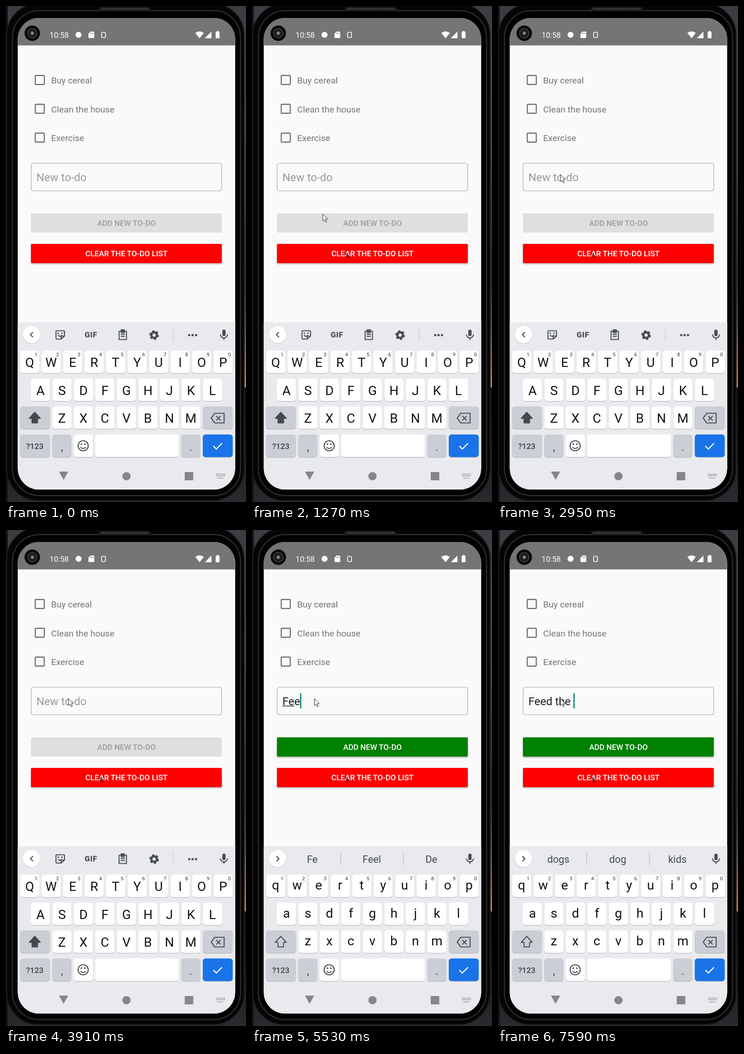
An HTML page that plays this animation: 521 by 1076 pixels, repeating every 8000 ms.

```html
<!DOCTYPE html>
<html lang="en">
<head>
<meta charset="utf-8">
<title>To-do list</title>
<style>
  html, body { margin: 0; width: 100%; height: 100%; overflow: hidden; background: #0b0b0c; }
  svg { display: block; width: 100%; height: 100%; font-family: Roboto, Arial, sans-serif; }
  text { white-space: pre; }
  .mid { text-anchor: middle; }
  .line { fill: none; stroke: #4a4d51; stroke-width: 2.2; }
</style>
</head>
<body>
<svg id="stage" viewBox="0 0 521 1076">
  <defs>
    <linearGradient id="wall" x2="0" y2="1">
      <stop offset="0" stop-color="#3c3d42"/><stop offset=".25" stop-color="#44454b"/>
      <stop offset=".55" stop-color="#2d2a32"/><stop offset=".63" stop-color="#53404a"/>
      <stop offset=".72" stop-color="#a9613a"/><stop offset=".768" stop-color="#d77a31"/>
      <stop offset=".77" stop-color="#0d0d10"/><stop offset="1" stop-color="#2a2b2f"/>
    </linearGradient>
    <filter id="lift" x="-5%" y="-20%" width="110%" height="160%">
      <feDropShadow dx="0" dy="2" stdDeviation="1.7" flood-opacity=".32"/>
    </filter>
    <clipPath id="screen"><rect x="25.5" y="26" width="472" height="1023" rx="46"/></clipPath>
  </defs>

  <rect width="521" height="1076" fill="url(#wall)"/>
  <rect width="4" height="1076" fill="#151517"/>
  <rect x="1.5" y="-5" width="515.5" height="1078" rx="68" fill="#050505" stroke="#1d1e20" stroke-width="2"/>
  <rect x="14" y="10" width="495" height="1052" rx="58" fill="#000" stroke="#2b2d2f" stroke-width="2.5"/>
  <rect x="202" y="2" width="111" height="9" rx="4" fill="#1c1c1c"/>
  <path d="M207 6.5H309" stroke="#4b4b4b" stroke-width="4" stroke-dasharray="2 2"/>

  <g clip-path="url(#screen)">
    <rect x="25" y="26" width="473" height="1024" fill="#fafafa"/>
    <rect x="25" y="26" width="473" height="59.5" fill="#757575"/>
    <rect x="25" y="686" width="473" height="364" fill="#e8eaed"/>
  </g>

  <circle cx="57" cy="59" r="16.7" fill="#080808"/>
  <circle cx="57" cy="59" r="10" fill="#171717" stroke="#474747" stroke-width="1.6"/>
  <circle cx="57" cy="59" r="4.5" fill="#555"/><circle cx="57" cy="59" r="2" fill="#aaa"/>
  <g fill="#fff">
    <text x="94.5" y="69" font-size="16.8">10:58</text>
    <circle cx="157.5" cy="62.5" r="6.5"/>
    <path d="M183.500 55.500H190a1.500 1.500 0 0 1 1.500 1.500V68a1.500 1.500 0 0 1-1.500 1.500H180.500a1.500 1.500 0 0 1-1.500-1.500V60Z"/>
    <path d="M183.500 58v3m2.700-3v3m2.700-3v3" stroke="#757575" stroke-width="1.200"/>
    <rect x="207.500" y="57" width="8.500" height="11.500" rx="2.500" fill="none" stroke="#fff" stroke-width="1.700"/>
    <path d="M411 58.500Q420 51.500 429.500 58.500L420.200 70ZM431.500 70L446 55.500V70ZM457.500 56V54.200H461.500V56H463.500V70H455.200V56Z"/>
  </g>

  <g id="page"></g>
  <g id="keys"></g>

  <circle cx="55.5" cy="714" r="18.7" fill="#c9cbcf"/>
  <circle cx="55.5" cy="713" r="18.5" fill="#fff"/>
  <path id="chevron" class="line" d="M58.500 707.500L53 713L58.500 718.500"/>
  <g id="tools" class="line">
    <path d="M110.500 704.500H125a2 2 0 0 1 2 2V716L120 722.500H110.500a2 2 0 0 1-2-2V706.500a2 2 0 0 1 2-2ZM127 716H120V722M113 714q4 5 8 0"/>
    <circle cx="113.500" cy="710" r=".7"/><circle cx="121.500" cy="710" r=".7"/>
    <text class="mid" x="184.500" y="719" font-size="16.500" font-weight="900" fill="#4a4d51" stroke="none" letter-spacing=".8">GIF</text>
    <path d="M245.500 705.500H261.500V723.500H245.500ZM249 713H258M249 717H258M249 709.500H258"/>
    <path d="M250 702.500H257V707H250Z" fill="#4a4d51"/>
    <circle cx="321.500" cy="714" r="6" stroke-width="5"/>
    <circle cx="321.500" cy="714" r="9" stroke-width="3" stroke-dasharray="4.700 4.725"/>
    <path d="M363 700.500V726.500" stroke="#c6c9cd" stroke-width="1.200"/>
    <g fill="#4a4d51" stroke="none"><circle cx="397.800" cy="714" r="2.500"/><circle cx="405" cy="714" r="2.500"/><circle cx="412.500" cy="714" r="2.500"/></g>
  </g>
  <g id="suggest" fill="#45484c" font-size="21.800">
    <path d="M192.500 699V727.500M329 699V727.500" stroke="#b9bcc1" stroke-width="1.300"/>
    <text class="mid" x="131" y="722"/><text class="mid" x="260" y="722"/><text class="mid" x="389.500" y="722"/>
  </g>
  <rect x="469.500" y="702" width="7.200" height="14" rx="3.600" fill="#4a4d51"/>
  <path class="line" d="M465.500 712.500a7.600 7.600 0 0 0 15.200 0M473.100 720V724.500"/>

  <g fill="#858688">
    <path d="M115 1010H135L125 1028Z"/><circle cx="261.500" cy="1020" r="9"/>
    <rect x="388" y="1011" width="18.500" height="18"/>
    <path d="M456 1015.500H475M456 1019H475M459 1024H472" stroke="#858688" stroke-width="2" stroke-dasharray="2 1.400"/>
  </g>

  <path id="smudge" d="M203 536l5 2 6 7-2 2-3-3v5l-3-1-1-5Z" fill="#5a1010" opacity=".65"/>
  <path id="pointer" d="M.500 .500V16L4 12.800L6.500 18.500L9 17.400L6.500 11.800H11Z" fill="#fff" stroke="#222" stroke-width="1"/>
</svg>

<script>
const LOOP = 8000;
const $ = id => document.getElementById(id);

function add(parent, tag, attrs, content) {
  const node = document.createElementNS('http://www.w3.org/2000/svg', tag);
  for (const name in attrs) node.setAttribute(name, attrs[name]);
  if (content !== undefined) node.textContent = content;
  parent.append(node);
  return node;
}
const show = (node, on) => node.setAttribute('visibility', on ? 'visible' : 'hidden');
const label = (parent, x, y, size, fill, text, extra) =>
  add(parent, 'text', { x, y, 'font-size': size, fill, ...extra }, text);
const centred = { class: 'mid' };
const medium = { class: 'mid', 'font-weight': 500 };

// To-do page
const page = $('page');
['Buy cereal', 'Clean the house', 'Exercise'].forEach((item, i) => {
  const y = 160.5 + i * 62.5;
  add(page, 'rect', { x: 63.5, y: y - 9.8, width: 19.6, height: 19.6, rx: 1.5, fill: 'none', stroke: '#6f6f6f', 'stroke-width': 2.4 });
  label(page, 98, y + 7.7, 19.25, '#757575', item);
});
add(page, 'rect', { x: 54.5, y: 341, width: 413.8, height: 60, rx: 5, fill: 'none', stroke: '#a6a6a6', 'stroke-width': 1.2 });
const hint = label(page, 66, 380, 24, '#9a9a9a', 'New to-do');
const entry = label(page, 66, 380, 24, '#212121', '');
const underline = add(page, 'rect', { y: 381.2, height: 1.4, fill: '#212121' });
const caret = add(page, 'rect', { y: 354, width: 2.6, height: 33, fill: '#008577' });

function button(y, fill, color, text, raised) {
  const group = add(page, 'g', {});
  const box = add(group, 'rect', { x: 54.2, y, width: 414.3, height: 41.8, rx: 2, fill });
  if (raised) box.setAttribute('filter', 'url(#lift)');
  label(group, 261.5, y + 27.4, 16.83, color, text, medium);
  return group;
}
const addOff = button(449.8, '#dfdfdf', '#9c9c9c', 'ADD NEW TO-DO', false);
const addOn = button(449.8, '#008000', '#fff', 'ADD NEW TO-DO', true);
button(516, '#f00', '#fff', 'CLEAR THE TO-DO LIST', true);

// Keyboard
const keys = $('keys');
const PITCH = 46.67, WIDE = 65, NARROW = 41.6;
function key(x, y, width, fill) {
  add(keys, 'rect', { x, y: y + 1.4, width, height: 49, rx: 6, fill: '#b4b7bc' });
  add(keys, 'rect', { x, y, width, height: 49, rx: 6, fill });
}
const GREY = '#cbced5', INK = '#111';
const letters = [];
['QWERTYUIOP', 'ASDFGHJKL', 'ZXCVBNM'].forEach((row, r) => {
  const y = 747.4 + r * 60.5;
  [...row].forEach((letter, i) => {
    const x = [30.5, 54, 100.5][r] + i * PITCH;
    key(x, y, NARROW, '#fff');
    const node = label(keys, x + NARROW / 2, 0, 28, INK, letter, centred);
    letters.push({ node, letter, y: y + 35.6 });
    if (!r) label(keys, x + 34.8, 760.3, 11.5, '#5f6368', (i + 1) % 10, medium);
  });
});
key(30.5, 868.4, WIDE, GREY);
key(427.2, 868.4, WIDE, GREY);
const shift = add(keys, 'path', { d: 'M62.500 881.500L74.500 894.500H68.500V904.500H56.500V894.500H50.500Z', stroke: '#45484c', 'stroke-width': 2, 'stroke-linejoin': 'round' });
add(keys, 'path', { class: 'line', d: 'M453 883.500H473.500V904.500H453L445.500 894ZM456.500 889.500L466 899M466 889.500L456.500 899' });

key(30.5, 929.4, WIDE, GREY);
key(100.5, 929.4, NARROW, GREY);
key(147.2, 929.4, NARROW, '#fff');
key(193.3, 929.4, 182, '#fff');
key(380.5, 929.4, NARROW, GREY);
key(427.2, 929.4, WIDE, '#1a73e8');
label(keys, 62.5, 961, 17.2, '#3c4043', '?123', medium);
label(keys, 121.5, 965, 23, '#3c4043', ',', centred);
label(keys, 401, 965, 23, '#3c4043', '.', centred);
add(keys, 'circle', { class: 'line', cx: 167.5, cy: 954, r: 11 });
add(keys, 'path', { class: 'line', d: 'M162 957q5.500 6.500 11 0' });
for (const cx of [163.7, 171.3]) add(keys, 'circle', { cx, cy: 950.5, r: 1.8, fill: '#4a4d51' });
add(keys, 'path', { d: 'M450 954.500L456.500 961L469 948.500', fill: 'none', stroke: '#fff', 'stroke-width': 2.4 });

// Time, typed text, underlined range, suggestions
const STEPS = [
  [0, '', 0, 0, ''],
  [4930, 'F', 0, 0, ''],
  [4980, 'F', 0, 1, 'F For Fr'],
  [5330, 'Fe', 0, 1, 'F For Fr'],
  [5480, 'Fe', 0, 2, 'Fe Feel De'],
  [5530, 'Fee', 0, 2, 'Fe Feel De'],
  [5680, 'Fee', 0, 3, 'Fee Feel See'],
  [5890, 'Feed', 0, 3, 'Fee Feel See'],
  [6040, 'Feed', 0, 4, 'Feed Feel Feeding'],
  [6090, 'Feed ', 0, 4, 'Feed Feel Feeding'],
  [6240, 'Feed ', 0, 0, 'my the them'],
  [6390, 'Feed t', 0, 0, 'my the them'],
  [6590, 'Feed t', 5, 6, 't the them'],
  [7090, 'Feed th', 5, 6, 't the them'],
  [7190, 'Feed th', 5, 7, 'th the they'],
  [7240, 'Feed the', 5, 7, 'th the they'],
  [7340, 'Feed the', 5, 8, 'the they then'],
  [7390, 'Feed the ', 5, 8, 'the they then'],
  [7590, 'Feed the ', 0, 0, 'dogs dog kids']
];
const BLINKS = [480, 970, 1470, 1980, 2480, 2950, 3460, 3910, 4420];

// Pointer strokes: start, end, steps, then a quadratic curve
const MOVES = [
  [200, 770, 12, [476, 1060], [215, 560], [156, 473]],
  [1170, 1680, 10, [155, 467], [148, 390], [130, 353]],
  [1830, 2540, 11, [129, 350], [126, 326], [135, 365]]
];

const pen = document.createElement('canvas').getContext('2d');
pen.font = '24px Roboto, Arial, sans-serif';
const widthOf = text => pen.measureText(text).width;

function pointerAt(t) {
  const move = MOVES.filter(m => t >= m[0]).pop();
  if (!move) return null;
  const [start, end, steps, a, b, c] = move;
  const count = steps - 1;
  const u = Math.min(count, Math.floor((t - start) / (end - start) * count + 1e-6)) / count;
  return [0, 1].map(i => (1 - u) ** 2 * a[i] + 2 * u * (1 - u) * b[i] + u * u * c[i]);
}

const tools = $('tools'), suggest = $('suggest'), pointer = $('pointer');
const words = suggest.querySelectorAll('text');

function draw(t) {
  const [, text, from, to, options] = STEPS.filter(s => t >= s[0]).pop();
  const typing = options !== '';
  entry.textContent = text;
  show(hint, !text);
  caret.setAttribute('x', 66 + widthOf(text));
  show(caret, text || BLINKS.filter(b => t >= b).length % 2);
  underline.setAttribute('x', 66 + widthOf(text.slice(0, from)));
  underline.setAttribute('width', widthOf(text.slice(from, to)));

  show(addOn, typing);
  show(addOff, !typing);
  show(tools, !typing);
  show(suggest, typing);
  options.split(' ').forEach((word, i) => words[i].textContent = word);
  $('chevron').setAttribute('transform', typing ? 'rotate(180 55.75 713)' : '');
  shift.setAttribute('fill', typing ? 'none' : '#45484c');
  for (const { node, letter, y } of letters) {
    node.textContent = typing ? letter.toLowerCase() : letter;
    node.setAttribute('y', typing ? y - 2.6 : y);
  }

  const at = pointerAt(t);
  show(pointer, at);
  if (at) pointer.setAttribute('transform', `translate(${at})`);
  show($('smudge'), t >= 620);
}

const begin = performance.now();
function tick() {
  draw((performance.now() - begin) % LOOP);
  requestAnimationFrame(tick);
}
tick();
</script>
</body>
</html>
```
